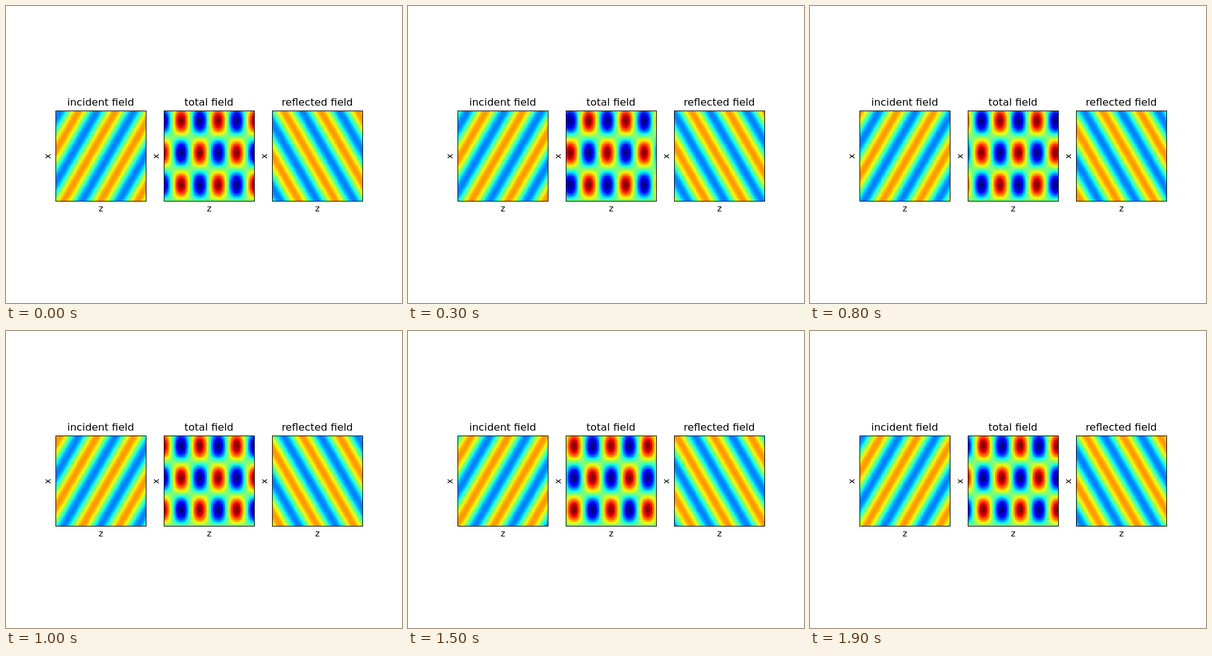
Write an HTML page with a canvas that moves like this. It is 640x480 px and loops after 2000 ms.

```html
<!DOCTYPE html>
<html lang="en">
<head>
<meta charset="utf-8">
<title>Plane wave reflection</title>
<style>
  html, body { margin: 0; width: 100%; height: 100%; overflow: hidden; background: #fff; }
  canvas, svg { position: absolute; left: 0; top: 0; }
  text { font: 13.89px "DejaVu Sans", sans-serif; text-anchor: middle; }
  .title { font-size: 16.67px; }
  rect { fill: none; stroke: #000; }
</style>
</head>
<body>
<canvas id="stage" width="640" height="480"></canvas>
<svg id="labels" width="640" height="480"></svg>
<script>
const LOOP = 2000, STEP = 100;
const TOP = 169, SIZE = 146, EXTENT = 145.88, CELLS = 100;
const WAVELENGTH = 51.7, ANGLE = Math.PI / 6;
const k = 2 * Math.PI / WAVELENGTH;
const kx = k * Math.sin(ANGLE), kz = k * Math.cos(ANGLE);

const incident = (z, x, phase) => Math.cos(kz * z - kx * x - phase);
const reflected = (z, x, phase) => -Math.cos(kz * z + kx * x - phase);
const total = (z, x, phase) => incident(z, x, phase) + reflected(z, x, phase);

const panels = [
  { left: 80, title: "incident field", field: incident },
  { left: 255, title: "total field", field: total },
  { left: 430, title: "reflected field", field: reflected },
];

document.getElementById("labels").innerHTML = panels.map(({ left, title }) => {
  const middle = left + SIZE / 2;
  return `<rect x="${left + 0.5}" y="${TOP + 0.5}" width="${SIZE}" height="${SIZE}"/>
    <text class="title" x="${middle}" y="161">${title}</text>
    <text x="${middle + 0.4}" y="332">z</text>
    <text transform="translate(${left - 8} 243) rotate(-90)">x</text>`;
}).join("");

// Rainbow colour map from dark blue (0) to dark red (1).
const clamp = v => Math.max(0, Math.min(1, v));
const ramp = (v, from, to) => clamp((v - from) / (to - from));
const palette = Array.from({ length: 256 }, (_, i) => {
  const v = i / 255;
  return [
    ramp(v, 0.35, 0.66) - 0.5 * ramp(v, 0.89, 1),
    ramp(v, 0.125, 0.375) - ramp(v, 0.64, 0.91),
    0.5 + 0.5 * ramp(v, 0, 0.11) - ramp(v, 0.34, 0.65),
  ].map(c => Math.round(255 * c));
});

// Centre of the grid cell that covers a pixel, measured from the panel's edge.
const cellSize = EXTENT / CELLS;
const cellCentre = pixel =>
  (Math.min(CELLS - 1, Math.floor((pixel + 0.5) / cellSize)) + 0.5) * cellSize;

const ctx = document.getElementById("stage").getContext("2d");
const image = ctx.createImageData(SIZE, SIZE);

function drawField({ left, field }, phase) {
  let p = 0;
  for (let row = 0; row < SIZE; row++) {
    const x = EXTENT - cellCentre(row);
    for (let col = 0; col < SIZE; col++) {
      const z = cellCentre(col) - EXTENT / 2;
      const level = clamp((field(z, x, phase) + 2) / 4);
      const [r, g, b] = palette[Math.min(255, Math.floor(level * 256))];
      image.data[p++] = r;
      image.data[p++] = g;
      image.data[p++] = b;
      image.data[p++] = 255;
    }
  }
  ctx.putImageData(image, left, TOP);
}

let shownStep = -1;
const start = performance.now();
function animate() {
  const time = Math.max(0, performance.now() - start) % LOOP;
  const step = Math.floor(time / STEP);
  if (step !== shownStep) {
    shownStep = step;
    const phase = 2 * Math.PI * step * STEP / LOOP;
    panels.forEach(panel => drawField(panel, phase));
  }
  requestAnimationFrame(animate);
}
animate();
</script>
</body>
</html>
```
